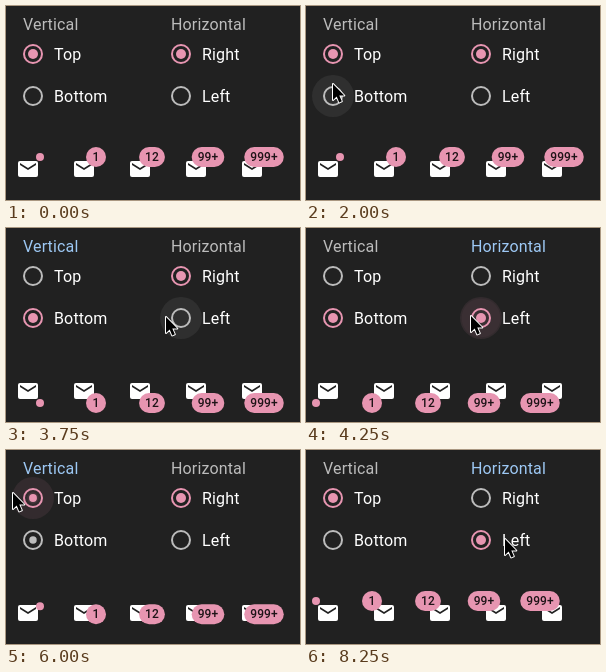
An HTML page with a canvas that plays this animation: 294 by 194 pixels, repeating every 9250 ms.

```html
<!DOCTYPE html>
<html lang="en">
<head>
<meta charset="utf-8">
<title>Badge alignment</title>
<style>
  html, body { margin: 0; width: 100%; height: 100%; overflow: hidden; background: #212121; }
  canvas { display: block; width: 294px; height: 194px; }
</style>
</head>
<body>
<canvas></canvas>
<script>
const W = 294, H = 194, LOOP = 9250, STEP = 250;
const BG = '#212121', PINK = '#e795b1', BLUE = '#9dc8f4', GREY = '#bcbcbc', WHITE = '#fff';
const canvas = document.querySelector('canvas');
const ctx = canvas.getContext('2d');
const ratio = window.devicePixelRatio || 1;
canvas.width = W * ratio;
canvas.height = H * ratio;

// Side -1 is top or left, 1 is bottom or right.
const groups = [
  { title: 'Vertical', x: 27, start: -1,
    options: [{ label: 'Top', side: -1, y: 48 }, { label: 'Bottom', side: 1, y: 90 }],
    clicks: [{ time: 2880, side: 1 }, { time: 5935, side: -1 }] },
  { title: 'Horizontal', x: 175, start: 1,
    options: [{ label: 'Right', side: 1, y: 48 }, { label: 'Left', side: -1, y: 90 }],
    clicks: [{ time: 3962, side: -1 }, { time: 4950, side: 1 },
             { time: 7970, side: -1, onLabel: true }] }
];
const badges = ['', '1', '12', '99+', '999+'];
const PRESS = 80;

// Pointer stops: time, x, y
const pointerPath = [
  [250, 176, -8], [500, 152, 12], [750, 122, 27], [1000, 94, 37], [1250, 74, 43],
  [1500, 2, 63], [1750, 2, 63], [2000, 27, 78], [2250, 26, 87], [2500, 26, 89],
  [3000, 26, 89], [3250, 40, 90], [3500, 100, 93], [3750, 160, 89], [4000, 165, 88],
  [4250, 165, 88], [4500, 169, 66], [4750, 172, 46], [5000, 172, 45], [5250, 150, 38],
  [5500, 75, 28], [5750, 10, 42], [6000, 7, 43], [7250, 7, 43],
  [7500, 208, 79], [7750, 201, 88], [8000, 199, 89], [9250, 199, 89]
];

const clamp = v => Math.max(0, Math.min(1, v));
const mix = (a, b, k) => a + (b - a) * k;

function bezier(x1, y1, x2, y2) {
  const at = (a, b, u) => 3 * a * u * (1 - u) ** 2 + 3 * b * u * u * (1 - u) + u ** 3;
  return value => {
    const x = clamp(value);
    if (x === 0 || x === 1) return x;
    let low = 0, high = 1;
    for (let i = 0; i < 24; i++) {
      const mid = (low + high) / 2;
      if (at(x1, x2, mid) < x) low = mid; else high = mid;
    }
    return at(y1, y2, low);
  };
}
const easeInOut = bezier(0.4, 0, 0.2, 1);
const easeOut = bezier(0, 0, 0.2, 1);
const easeIn = bezier(0.4, 0, 1, 1);

function pointerAt(t) {
  if (t < pointerPath[0][0]) return null;
  const next = pointerPath.findIndex(p => p[0] > t);
  const a = pointerPath[next - 1], b = pointerPath[next];
  const k = (t - a[0]) / (b[0] - a[0]);
  return { x: mix(a[1], b[1], k), y: mix(a[2], b[2], k) };
}

function selection(group, t) {
  let side = group.start, from = side, age = Infinity;
  for (const click of group.clicks) {
    if (click.time > t) break;
    from = side;
    side = click.side;
    age = t - click.time;
  }
  return { side, from, age };
}

function focusedGroup(t) {
  let latest = -1, focused = null;
  for (const group of groups) {
    for (const click of group.clicks) {
      const time = click.onLabel ? click.time : click.time - PRESS;
      if (time <= t && time > latest) { latest = time; focused = group; }
    }
  }
  return focused;
}

function disc(x, y, r, color, alpha = 1) {
  ctx.globalAlpha = alpha;
  ctx.fillStyle = color;
  ctx.beginPath();
  ctx.arc(x, y, r, 0, Math.PI * 2);
  ctx.fill();
  ctx.globalAlpha = 1;
}

function polygon(points) {
  ctx.beginPath();
  points.forEach(([x, y]) => ctx.lineTo(x, y));
  ctx.closePath();
}

function label(text, x, y, color) {
  ctx.font = '400 16px Roboto, sans-serif';
  ctx.letterSpacing = '0.15px';
  ctx.textAlign = 'left';
  ctx.fillStyle = color;
  ctx.fillText(text, x, y);
}

function drawRipple(x, y, click, t) {
  const held = t - click.time + PRESS;
  if (held < 0) return;
  const grow = easeInOut(held / 550);
  const fade = 1 - easeInOut((t - click.time) / 550);
  disc(x, y, 21 * grow, PINK, mix(0.08, 0.2, grow) * fade);
}

function drawRadio(group, option, state, pointer, t) {
  const { x } = group, { y, side } = option;
  const checked = state.side === side;
  const color = checked ? PINK : GREY;
  if (pointer && Math.abs(pointer.x - x) <= 21 && Math.abs(pointer.y - y) <= 21)
    disc(x, y, 21, color, 0.09);
  for (const click of group.clicks)
    if (click.side === side && !click.onLabel) drawRipple(x, y, click, t);

  ctx.strokeStyle = color;
  ctx.lineWidth = 2;
  ctx.beginPath();
  ctx.arc(x, y, 9, 0, Math.PI * 2);
  ctx.stroke();

  const k = state.age / 150;
  const scale = checked ? easeOut(k) : 1 - easeIn(k);
  if (scale > 0) disc(x, y, 5 * scale, color);
  label(option.label, x + 21, y + 5.5, WHITE);
}

function drawMail(x, y) {
  ctx.fillStyle = WHITE;
  ctx.beginPath();
  ctx.roundRect(x + 2, y + 4, 20, 16, 2);
  ctx.fill();
  ctx.fillStyle = BG;
  polygon([[x + 4, y + 6], [x + 12, y + 11], [x + 20, y + 6],
           [x + 20, y + 8], [x + 12, y + 13], [x + 4, y + 8]]);
  ctx.fill();
}

// The anchor edge switches at once; only the half-size shift is eased.
function badgeCenter(start, size, state) {
  const edge = state.side < 0 ? start : start + 24;
  const shift = mix(state.from, state.side, easeInOut(state.age / 225));
  return edge + (shift - state.side) * size / 2;
}

function drawBadge(text, x, y, vertical, horizontal) {
  ctx.font = '500 12px Roboto, sans-serif';
  ctx.letterSpacing = '0.1px';
  const height = text ? 20 : 8;
  const width = text ? Math.max(20, ctx.measureText(text).width + 12) : 8;
  const cx = badgeCenter(x, width, horizontal);
  const cy = badgeCenter(y, height, vertical);
  ctx.fillStyle = PINK;
  ctx.beginPath();
  ctx.roundRect(cx - width / 2, cy - height / 2, width, height, height / 2);
  ctx.fill();
  ctx.textAlign = 'center';
  ctx.fillStyle = 'rgba(0,0,0,0.87)';
  ctx.fillText(text, cx, cy + 4.2);
}

function drawPointer({ x, y }) {
  ctx.save();
  ctx.translate(x, y);
  polygon([[0, 0], [0, 16], [3.7, 12.6], [6.2, 18.4], [8.8, 17.3], [6.3, 11.6], [11.3, 11.6]]);
  ctx.lineJoin = 'round';
  ctx.lineWidth = 2;
  ctx.strokeStyle = WHITE;
  ctx.stroke();
  ctx.fillStyle = '#000';
  ctx.fill();
  ctx.restore();
}

function draw(t) {
  ctx.setTransform(ratio, 0, 0, ratio, 0, 0);
  ctx.fillStyle = BG;
  ctx.fillRect(0, 0, W, H);

  const pointer = pointerAt(t);
  const focused = focusedGroup(t);
  const states = groups.map(group => selection(group, t));
  groups.forEach((group, i) => {
    label(group.title, group.x - 10, 24, group === focused ? BLUE : GREY);
    for (const option of group.options) drawRadio(group, option, states[i], pointer, t);
  });
  badges.forEach((text, i) => {
    const x = 10 + 56 * i;
    drawMail(x, 151);
    drawBadge(text, x, 151, ...states);
  });
  if (pointer) drawPointer(pointer);
}

const begin = performance.now();
function tick() {
  const elapsed = (performance.now() - begin) % LOOP;
  draw(Math.floor(elapsed / STEP) * STEP);
  requestAnimationFrame(tick);
}
tick();
</script>
</body>
</html>
```
